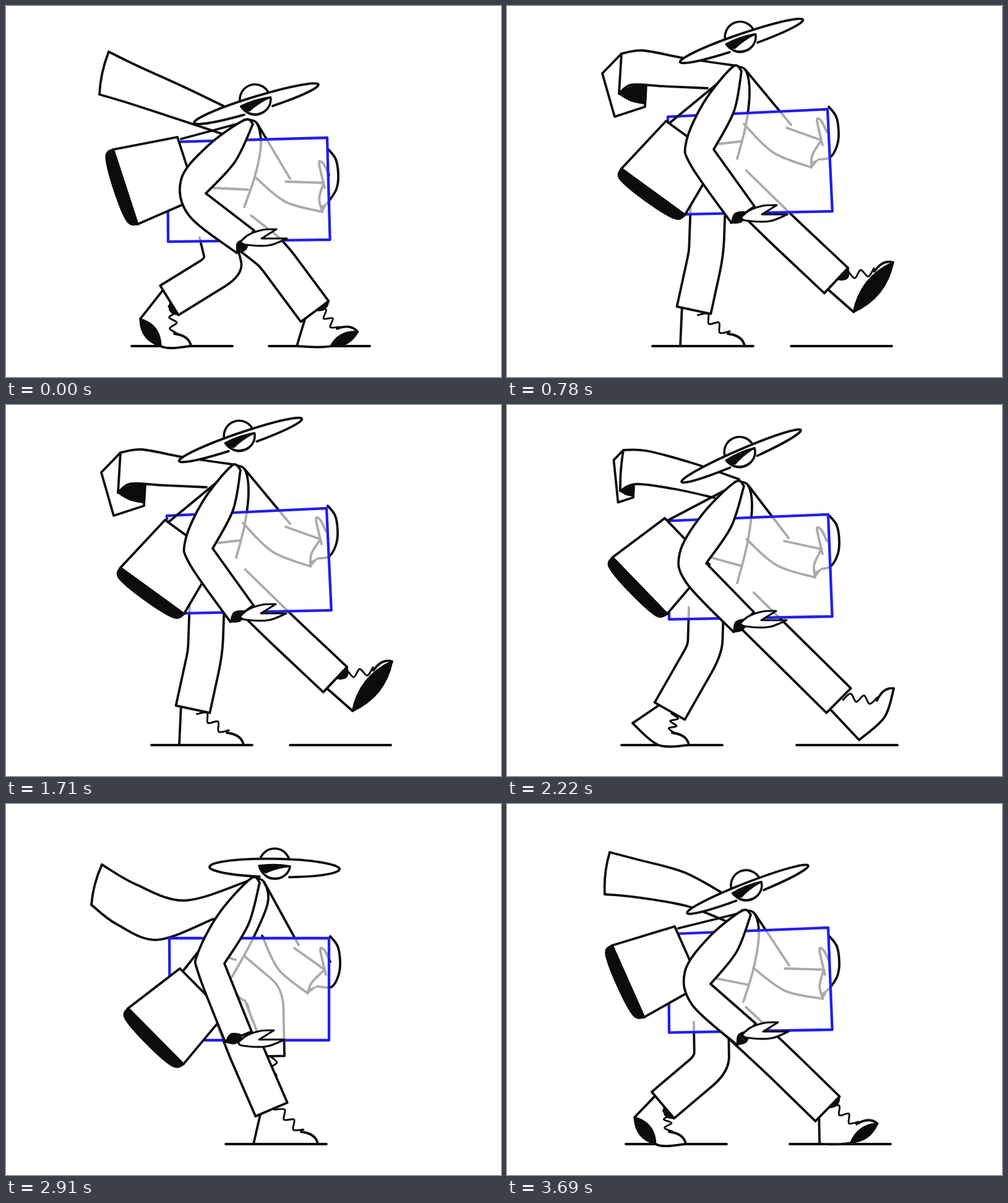
Recreate the animation shown at these times as an HTML page. Size 800 px wide and 600 px high, loop 3720 ms.

```html
<!DOCTYPE html>
<html lang="en">
<head>
<meta charset="utf-8">
<title>Walking with a parcel</title>
<style>
html, body { margin: 0; width: 100%; height: 100%; overflow: hidden; background: #fff; }
svg { display: block; width: 100vw; height: 100vh; }
path { stroke-linecap: round; stroke-linejoin: round; }
</style>
</head>
<body>
<svg id="stage" viewBox="0 0 800 600"></svg>
<script>
const INK = '#0c0c0c', BLUE = '#1f1fee';
const STEP = 465, STRIDE = 930, TICK = 30;

// Periodic monotone cubic through key values.
function track(times, period, rows) {
  const n = times.length;
  const gap = i => (times[(i + 1) % n] - times[i] + period) % period;
  const rate = (i, k) => (rows[(i + 1) % n][k] - rows[i][k]) / gap(i);
  const slope = (i, k) => {
    const j = (i + n - 1) % n, a = rate(j, k), b = rate(i, k);
    if (a * b <= 0) return 0;
    const g = gap(j), h = gap(i), w = 2 * h + g, v = h + 2 * g;
    return (w + v) / (w / a + v / b);
  };
  return time => {
    const t = time % period;
    let i = n - 1;
    while (times[i] > t) i--;
    const h = gap(i), s = (t - times[i]) / h, j = (i + 1) % n;
    const s2 = s * s, s3 = s2 * s;
    return rows[i].map((a, k) =>
      a * (2 * s3 - 3 * s2 + 1) + rows[j][k] * (3 * s2 - 2 * s3) +
      h * (slope(i, k) * (s3 - 2 * s2 + s) + slope(j, k) * (s3 - s2)));
  };
}

// Vectors
const add = (a, b, s = 1) => [a[0] + b[0] * s, a[1] + b[1] * s];
const sub = (a, b) => add(a, b, -1);
const mix = (a, b, s) => add(a, sub(b, a), s);
const unit = (a, b) => { const d = sub(b, a), l = Math.hypot(...d) || 1; return [d[0] / l, d[1] / l]; };
const left = v => [v[1], -v[0]];
const turn = (v, deg) => {
  const a = deg * Math.PI / 180, c = Math.cos(a), s = Math.sin(a);
  return [v[0] * c - v[1] * s, v[0] * s + v[1] * c];
};
const clamp = v => Math.min(1, Math.max(0, v));

// Paths
const xy = p => p[0].toFixed(1) + ' ' + p[1].toFixed(1);
const poly = (...p) => 'M' + p.map(xy).join('L');
function curve(p, lead = 'M') {
  let d = lead + xy(p[0]);
  for (let i = 0; i + 1 < p.length; i++) {
    const a = p[i - 1] || p[i], b = p[i], c = p[i + 1], e = p[i + 2] || c;
    d += 'C' + xy(add(b, sub(c, a), 1 / 6)) + ' ' + xy(add(c, sub(e, b), -1 / 6)) + ' ' + xy(c);
  }
  return d;
}
const bend = (a, b, c, r, lead) =>
  lead + xy(a) + 'L' + xy(mix(b, a, r)) + 'Q' + xy(b) + ' ' + xy(mix(b, c, r)) + 'L' + xy(c);
// Leaf between two points, bulging by u to the left and v to the right.
const leaf = (a, b, u, v) => {
  const m = mix(a, b, 0.5), n = left(unit(a, b));
  return 'M' + xy(a) + 'Q' + xy(add(m, n, 2 * u)) + ' ' + xy(b) + 'Q' + xy(add(m, n, -2 * v)) + ' ' + xy(a) + 'Z';
};

// Body poses within one step: contact, passing, high point, reach, drop.
const body = (...rows) => track([0, 120, 315, 360, 435], STEP, rows);
const shoulderAt = body([391, 186], [402, 122], [371, 100], [375, 126], [386, 174]);
const elbowAt = body([323, 303], [353, 258], [334, 232], [322, 256], [329, 291]);
const wristAt = body([401, 363], [397, 368], [400, 324], [399, 335], [402, 355]);
const coatAt = body([385, 325], [365, 280], [372, 247], [372, 288], [382, 320]);
const farElbowAt = body([452, 284], [466, 233], [452, 197], [448, 220], [449, 266]);
const farWristAt = body([513, 286], [515, 268], [508, 217], [508, 233], [512, 268]);
const parcelAt = body([519, 213, 1.6], [522, 217, 0], [518, 167, 2.7], [519, 177, 2.3], [519, 200, 2.3]);
const bagAt = body([277, 212, 72], [281, 266, 45.3], [257, 186, 36], [255, 183, 46], [271, 198, 66]);
const hatAt = body([404.5, 158, -17.1], [434, 103.5, 1], [379, 56.5, -19], [378.5, 82.5, -23.5], [389, 138, -21.4]);
const foldAt = body([0], [0], [1], [0.5], [0]);
// Scarf: top edge from neck to tip, then its width at neck and tip.
const scarfAt = body(
  [352,162, 290,132, 215,98, 166,74, -2,45, -15,69],
  [395,123, 290,156, 210,130, 155,98, -60,63, -17,65],
  [372,97, 285,84, 220,72, 185,77, -48,36, -4,65],
  [375,120, 300,94, 225,74, 188,73, -40,30, -5,66],
  [345,142, 285,110, 208,89, 166,78, 10,48, -8,68]
);

// One leg through a stride: contact, stance, push-off, swing, reach.
const stride = (...rows) => track([0, 120, 315, 360, 435, 465, 585, 685, 780, 825, 900], STRIDE, rows);
// Hip, knee, hem
const legAt = stride(
  [379,361, 430,401, 499,494], [360,328, 387,397, 429,494], [325,317, 322,400, 302,492],
  [322,328, 320,395, 263,495], [330,352, 331,420, 252,487], [340,368, 353,421, 264,476],
  [368,268, 420,312, 422,408], [367,267, 451,312, 502,395], [367,286, 449,366, 532,444],
  [379,323, 445,388, 536,478], [367,349, 437,414, 518,493]
);
// Ball of the foot, heel tilt, toe tilt, visible sole
const footAt = stride(
  [525,550, 0,-28,8], [455,550, 0,0,0], [335,550, 0,0,0], [245,550, 40,0,0],
  [240,550, 52,0,10], [250,550, 53,0,10], [402,455, 50,50,0], [540,436, -20,-25,8],
  [601,458, -42,-62,13], [610,505, -42,-72,0], [560,547, -3,-38,8]
);

const NS = 'http://www.w3.org/2000/svg';
const stage = document.getElementById('stage');
function make(tag, attrs, parent = stage) {
  const el = document.createElementNS(NS, tag);
  for (const k in attrs) el.setAttribute(k, attrs[k]);
  return parent.appendChild(el);
}
const pen = (fill = 'none', width = 3.8, parent = stage, stroke = INK) =>
  make('path', { fill, stroke, 'stroke-width': width }, parent);
const put = (el, d) => el.setAttribute('d', d);

const floors = [pen(), pen()];
const flap = pen('#fff'), scarf = pen('#fff'), fold = pen(INK, 2.5);
const legs = [0, 1].map(() => ({
  shoe: pen('#fff'), sole: pen(INK, 3), laces: pen('none', 3), cuff: pen(INK, 2), trouser: pen('#fff')
}));
const far = pen(), farCuff = pen(INK, 1.5), coat = pen();
const veil = make('path', { fill: '#fff', 'fill-opacity': 0.65 });
const parcel = pen('none', 4.3, stage, BLUE);
const strap = pen(), bag = pen('#fff'), base = pen(INK);
const arm = pen('#fff'), cuff = pen(INK, 2), hand = pen('#fff', 3.2);
const head = make('g', {});
make('circle', { cy: -7, r: 24.5, fill: '#fff', stroke: INK, 'stroke-width': 3.6 }, head);
const brim = pen('#fff', 3.8, head);
put(pen('#fff', 3.6, head), 'M-25 -3Q0 -7 25 -3C23 10 12 17 1 17C-11 17 -21 10 -25 -3Z');
put(pen(INK, 2, head), 'M-25 -3Q0 -7 24 -3Q2 0 -14 8Q-22 4 -25 -3Z');

function drawScarf(t) {
  const v = scarfAt(t), p = [0, 2, 4, 6, 8, 10].map(i => v.slice(i, i + 2));
  const top = p.slice(0, 4), low = top.map((q, i) => add(q, mix(p[4], p[5], i / 3))).reverse();
  const tip = top[3], end = low[0], [f] = foldAt(t);
  const bow = add(mix(tip, end, 0.5), [-6 * (1 - f), 0]);
  put(scarf, curve(top) + 'Q' + xy(bow) + ' ' + xy(end) + curve(low, 'L'));
  const at = (q, x, y) => add(q, [x, y], f);
  put(flap, poly(tip, at(tip, -31, 32), at(end, -7, 37), at(end, 42, 21), at(end, 44, -14)));
  put(fold, f < 0.02 ? '' : curve([end, at(end, 19, -11), at(end, 44, -15)]) +
    curve([at(end, 42, 16), at(end, 19, 11), end], 'L') + 'Z');
}

function drawLeg(el, floor, time) {
  const t = time % STRIDE, v = legAt(t);
  const hip = v.slice(0, 2), knee = v.slice(2, 4), ankle = v.slice(4);
  const n1 = left(unit(hip, knee)), n2 = left(unit(knee, ankle));
  const miter = 28 / (1 + n1[0] * n2[0] + n1[1] * n2[1]);
  const side = s => [add(hip, n1, 28 * s), add(knee, add(n1, n2), miter * s), add(ankle, n2, 28 * s)];
  const front = side(1), back = side(-1);
  put(el.trouser, bend(...front, 0.3, 'M') + bend(...back.reverse(), 0.1, 'L'));

  const [x, y, tilt, lift, show] = footAt(t), ball = [x, y];
  const heel = add(ball, turn([-55, 0], tilt)), toe = add(ball, turn([49, 0], lift));
  const cap = add(ball, turn([46, -17], lift)), tie = add(ball, turn([22, -20], lift));
  const hemF = front[2], hemB = back[0], top = mix(hemB, hemF, 0.7);
  put(el.shoe, poly(mix(hemB, hemF, 0.15), heel) + curve([heel, ball, toe], 'L') +
    'Q' + xy(cap) + ' ' + xy(tie) + 'L' + xy(tie) + 'M' + xy(top));

  const across = left(unit(tie, top)), zig = [];
  for (let k = 0; k < 6; k++) zig.push(add(mix(tie, top, k / 5), across, k % 2 ? 7 : -5));
  put(el.laces, curve(zig));

  const from = tilt > 0 ? heel : mix(ball, heel, clamp(-tilt / 40));
  put(el.sole, show < 1 ? '' : leaf(from, tilt > 0 ? ball : toe, show, show));
  put(el.cuff, show < 1 ? '' : leaf(hemF, mix(hemF, hemB, 0.45), show * 0.8, 0));

  const start = x - 100 + tilt, length = 163 * clamp((Math.abs(t - 625) - 65) / 80);
  put(floor, length < 6 ? '' : poly([start, 550], [start + length, 550]));
}

function drawParcel(t, shoulder) {
  const [x, y, tilt] = parcelAt(t), k = Math.tan(tilt * Math.PI / 180);
  const box = poly([x, y], [x + 165 * k, y + 165], [x - 257, y + 165 + 115 * k], [x - 258, y + 258 * k]) + 'Z';
  put(veil, box);
  put(parcel, box);

  const elbow = farElbowAt(t), wrist = farWristAt(t);
  const down = left(unit(wrist, elbow)), under = add(wrist, down, 47);
  const pit = add(shoulder, [12, 91]), sag = left(unit(under, pit));
  const from = (dx, dy) => add(wrist, [dx, dy]), edge = (dx, dy) => [x + dx, wrist[1] + dy];
  const bow = add(mix(wrist, under, 0.55), [-6, 0]), palm = add(mix(wrist, under, 0.7), [7, 0]);
  put(far, poly(add(shoulder, [15, 4]), add(elbow, [7, -5])) + poly(elbow, wrist) +
    curve([pit, add(mix(pit, under, 0.5), sag, 13), under]) + curve([wrist, bow, under]) +
    curve([from(2, 8), from(-7, -32), from(0, -31), from(9, -13)]) +
    curve([edge(2, -54), edge(14, -38), edge(18, -12), edge(15, 10), edge(4, 28), palm]));
  put(farCuff, poly(under, mix(bow, under, 0.6), palm) + 'Z');
}

function drawBag(t, shoulder) {
  const [x, y, deg] = bagAt(t), at = (dx, dy) => add([x, y], turn([dx, dy], deg));
  // Local x runs along the base, local y out towards it.
  const skew = -13, tl = at(skew, 105), bl = at(skew + 127, 105);
  put(bag, poly(tl, at(0, 0), at(104, 0), bl) + 'Z');
  put(base, curve([tl, at(skew + 8, 119), at(skew + 60, 123), at(skew + 116, 119), bl]) + 'Z');
  put(strap, poly(add([x, y], [6, 3]), shoulder));
}

function drawArm(t, shoulder) {
  const elbow = elbowAt(t), wrist = wristAt(t);
  const up = left(unit(elbow, shoulder)), fore = unit(elbow, wrist), out = left(fore).map(c => -c);
  const mid = mix(elbow, shoulder, 0.5), edge = add(wrist, out, 46);
  const inner = add(shoulder, [8, 5]);
  put(arm, curve([inner, add(shoulder, [-7, -1]), add(mid, up, -36 * Math.sign(up[0] || 1) * Math.sign(up[0] || 1) * (up[0] < 0 ? -1 : 1)),
    add(elbow, up, up[0] < 0 ? 46 : -46), add(elbow, out, 45), edge]) + 'L' + xy(wrist) +
    curve([elbow, add(mid, up, up[0] < 0 ? -15 : 15), inner], 'L') + 'Z');

  const seam = mix(edge, wrist, 0.3);
  const c = [edge, add(seam, fore, -9), mix(edge, wrist, 0.62), add(seam, fore, 8), edge];
  put(cuff, curve(c) + 'Z');
  const at = (dx, dy) => add(wrist, [dx, dy]);
  put(hand, curve([at(-22, 18), at(-9, 7), at(14, -1), at(36, -2)]) + 'L' + xy(at(12, 13)) +
    curve([at(53, 13), at(24, 24), at(-14, 23), at(-22, 18)], 'L') + 'Z');

  const hem = coatAt(t), from = (dx, dy) => add(shoulder, [dx, dy]), lapel = from(21, 38);
  put(coat, curve([from(-6, -2), from(14, 3), lapel, add(mix(lapel, hem, 0.5), [4, 0]), hem]) +
    poly(add(elbow, [9, -9]), add(hem, [6, -28])));
}

function drawHat(t) {
  const [x, y, tilt] = hatAt(t), ry = 15 - Math.abs(tilt) / 5, low = ry * 0.973;
  head.setAttribute('transform', `translate(${x} ${y}) rotate(${tilt})`);
  put(brim, `M24 ${low}A105 ${ry} 0 1 0 -24 ${low}`);
}

function draw(time) {
  const t = Math.floor(time / TICK) * TICK % STRIDE, shoulder = shoulderAt(t);
  drawScarf(t);
  drawLeg(legs[0], floors[0], t + STEP);
  drawLeg(legs[1], floors[1], t);
  drawParcel(t, shoulder);
  drawBag(t, shoulder);
  drawArm(t, shoulder);
  drawHat(t);
}

function loop() {
  draw(performance.now());
  requestAnimationFrame(loop);
}
draw(0);
requestAnimationFrame(loop);
</script>
</body>
</html>
```
